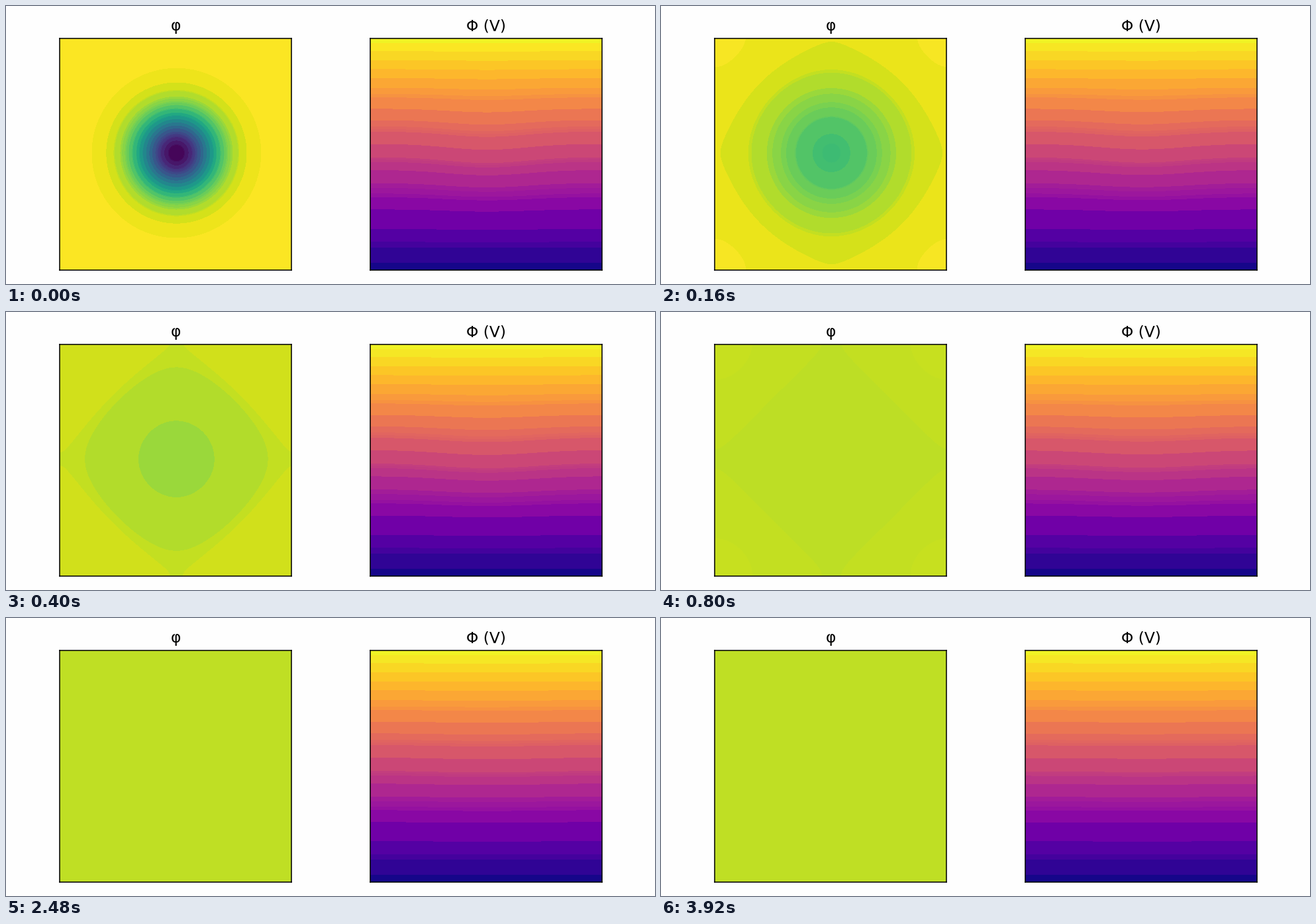
A matplotlib script that plays this animation: 980x420 px, repeating every 4 s.

```python
import matplotlib
import matplotlib.pyplot as plt
import numpy as np
from matplotlib.animation import FuncAnimation

W, H, DPI = 980, 420, 140
FRAMES, INTERVAL = 50, 80
TOP, SIZE = 49, 350

# Concentration: a Gaussian dip that diffuses in a periodic box.
VAR0 = 0.015 * SIZE**2
VAR_STEP = 2010

# Potential: a sag in the level lines that slowly flattens.
SAG, SAG_SX, SAG_SY, SAG_TAU = 9.0, 60.0, 62.0, 24.0

pixels = np.arange(SIZE) + 0.5
x = pixels - 176.4
y = pixels - 173.6


def periodic_gauss(d, var):
    images = SIZE * np.arange(-6, 7)
    return np.exp(-(d[:, None] + images) ** 2 / (2 * var)).sum(axis=1)


def concentration(n):
    var = VAR0 + VAR_STEP * n
    return 1 - VAR0 / var * np.outer(periodic_gauss(y, var), periodic_gauss(x, var))


def potential(n):
    wave = 2 * np.pi / SIZE
    mean = np.sqrt(2 * np.pi) * SAG_SX / SIZE
    across = np.zeros(SIZE)
    for m in range(1, 5):
        start = np.exp(-(m * wave * SAG_SX) ** 2 / 2)
        across += 2 * mean * start * np.exp(-m * m * n / SAG_TAU) * np.cos(m * wave * x)
    down = np.exp(-y**2 / (2 * SAG_SY**2))
    return 1 - (pixels[:, None] - SAG * np.outer(down, across)) / SIZE


def posterize(rgb):
    """Group colours by 3, 4 and 3 leading bits and use each group's mean."""
    r, g, b = (rgb[..., i].astype(int).ravel() for i in range(3))
    group = (r >> 5) << 7 | (g >> 4) << 3 | b >> 5
    count = np.maximum(np.bincount(group, minlength=1024), 1)
    means = [np.bincount(group, c, minlength=1024) // count for c in (r, g, b)]
    return np.stack(means, axis=1).astype(np.uint8)[group].reshape(rgb.shape)


def paint(n):
    """Both panels share one reduced palette."""
    viridis, plasma = matplotlib.colormaps["viridis"], matplotlib.colormaps["plasma"]
    phase = viridis(np.clip(concentration(n), 0, 1), bytes=True)
    volt = plasma(np.clip(potential(n), 0, 1), bytes=True)
    return np.split(posterize(np.hstack([phase, volt])[..., :3]), 2, axis=1)


fig = plt.figure(figsize=(W / DPI, H / DPI), dpi=DPI, facecolor="#fefefe")


def panel(left, title, picture):
    ax = fig.add_axes([left / W, 1 - (TOP + SIZE) / H, SIZE / W, SIZE / H])
    ax.set_title(title, fontsize=12, fontfamily="DejaVu Sans")
    ax.set_xticks([])
    ax.set_yticks([])
    return ax.imshow(picture, interpolation="nearest", aspect="auto")


panels = [panel(left, title, picture)
          for left, title, picture in zip((81, 550), ("φ", "Φ (V)"), paint(0))]


def update(n):
    for image, picture in zip(panels, paint(n)):
        image.set_data(picture)
    return panels


anim = FuncAnimation(fig, update, frames=FRAMES, interval=INTERVAL,
                     repeat=True, repeat_delay=0, blit=False)
plt.show()
```
